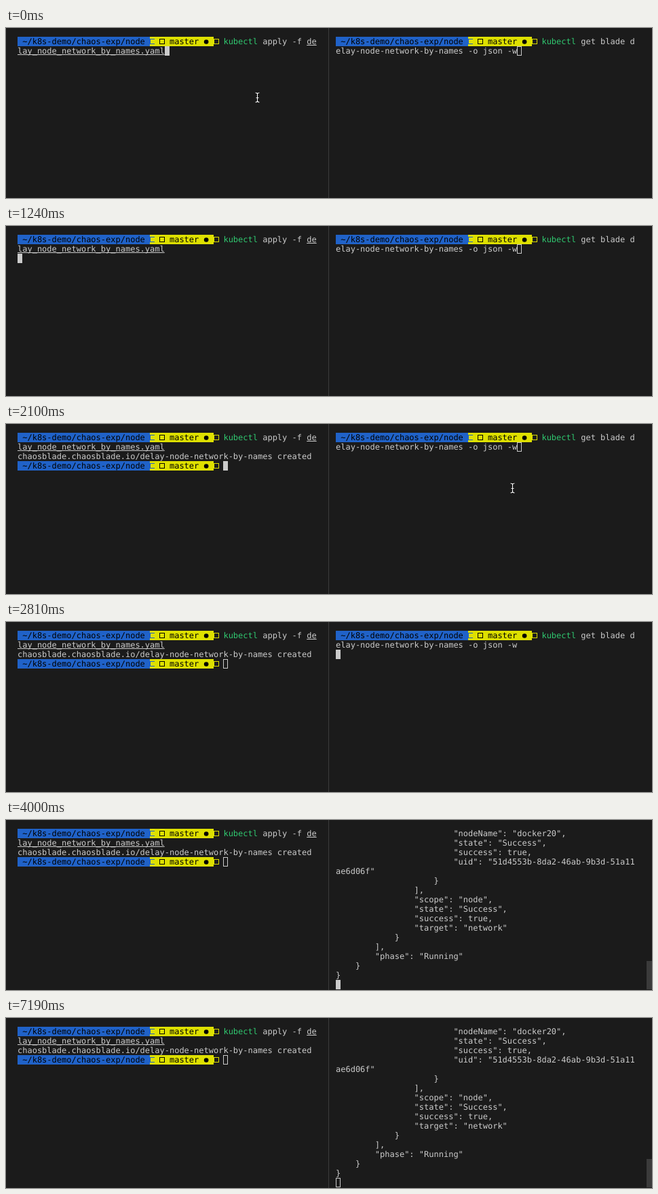
An HTML page with a canvas for the animation above (8000 ms loop, 952 by 252 pixels).

```html
<!DOCTYPE html>
<html lang="en">
<head>
<meta charset="utf-8">
<title>Terminal panes</title>
<style>
  html, body { margin: 0; width: 100%; height: 100%; overflow: hidden; background: #1b1b1b; }
  canvas { display: block; }
</style>
</head>
<body>
<canvas id="stage" width="952" height="252"></canvas>
<script>
const ctx = document.getElementById('stage').getContext('2d');
const LOOP = 8000, CELL = 7.224, ROW = 14, TOP = 13;
const LEFT = 17, RIGHT = 486;
const BG = '#1b1b1b', FG = '#cbcbcb', BLUE = '#2062c8', YELLOW = '#dee000', GREEN = '#30c870';

// When each thing happens, in ms
const APPLY = 860, CREATED = 1280, PROMPT = 1330, MOVE = 1670, ARRIVE = 2060;
const CLICK = 2290, WATCH = 2760, OUTPUT = 2950, BLUR = 5290;

const OUTPUT_LINES = [
  [24, '"nodeName": "docker20",'],
  [24, '"state": "Success",'],
  [24, '"success": true,'],
  [24, '"uid": "51d4553b-8da2-46ab-9b3d-51a11'],
  [0, 'ae6d06f"'],
  [20, '}'],
  [16, '],'],
  [16, '"scope": "node",'],
  [16, '"state": "Success",'],
  [16, '"success": true,'],
  [16, '"target": "network"'],
  [12, '}'],
  [8, '],'],
  [8, '"phase": "Running"'],
  [4, '}'],
  [0, '}'],
];

const colX = (pane, col) => pane + col * CELL;
const rowY = row => TOP + row * ROW;

function rect(x, y, w, h, color) {
  ctx.fillStyle = color;
  ctx.fillRect(x, y, w, h);
}

function frame(x, y, w, h, color) {
  ctx.strokeStyle = color;
  ctx.lineWidth = 1;
  ctx.strokeRect(x + 0.5, y + 0.5, w - 1, h - 1);
}

// Every character sits on the terminal grid.
function text(pane, col, row, string, color = FG) {
  ctx.fillStyle = color;
  [...string].forEach((char, i) => ctx.fillText(char, colX(pane, col + i), rowY(row) + 11));
}

function underlined(pane, col, row, string) {
  text(pane, col, row, string);
  rect(colX(pane, col), rowY(row) + 12, string.length * CELL, 1, FG);
}

function prompt(pane, row) {
  const y = rowY(row);
  const blueEnd = Math.round(colX(pane, 27)), yellowEnd = Math.round(colX(pane, 40));
  rect(pane, y, blueEnd - pane, ROW, BLUE);
  rect(blueEnd, y, yellowEnd - blueEnd, ROW, YELLOW);
  text(pane, 1, row, '~/k8s-demo/chaos-exp/node', '#000');
  rect(blueEnd, y + 3, 7, 1, BLUE);
  rect(blueEnd, y + 3, 1, 8, BLUE);
  rect(blueEnd, y + 10, 7, 1, BLUE);
  frame(Math.round(colX(pane, 29)), y + 3, 8, 8, '#000');
  text(pane, 31, row, 'master', '#000');
  ctx.beginPath();
  ctx.arc(colX(pane, 38.5), y + 7.5, 3.3, 0, Math.PI * 2);
  ctx.fill();
  frame(yellowEnd, y + 3, 8, 8, YELLOW);
}

function cursor(pane, col, row, focused) {
  const x = Math.round(colX(pane, col)), y = rowY(row);
  if (focused) rect(x, y, 7, ROW, FG);
  else frame(x, y, 7, ROW, FG);
}

function pointer(x, y) {
  ctx.save();
  ctx.translate(x + 0.5, y);
  ctx.beginPath();
  for (const s of [-1, 1]) {
    ctx.moveTo(-3, 7 * s);
    ctx.quadraticCurveTo(0, 7 * s, 0, 5 * s);
    ctx.quadraticCurveTo(0, 7 * s, 3, 7 * s);
  }
  ctx.moveTo(0, -5.5);
  ctx.lineTo(0, 5.5);
  ctx.moveTo(-2, 0.5);
  ctx.lineTo(2, 0.5);
  ctx.lineWidth = 2.6;
  ctx.strokeStyle = '#000';
  ctx.stroke();
  ctx.lineWidth = 1.2;
  ctx.strokeStyle = '#fff';
  ctx.stroke();
  ctx.restore();
}

function leftPane(t) {
  prompt(LEFT, 0);
  text(LEFT, 42, 0, 'kubectl', GREEN);
  text(LEFT, 50, 0, 'apply -f');
  underlined(LEFT, 59, 0, 'de');
  underlined(LEFT, 0, 1, 'lay_node_network_by_names.yaml');
  if (t >= CREATED) text(LEFT, 0, 2, 'chaosblade.chaosblade.io/delay-node-network-by-names created');
  if (t >= PROMPT) prompt(LEFT, 3);

  const focused = t < CLICK;
  if (t < APPLY) cursor(LEFT, 30, 1, focused);
  else if (t < CREATED) cursor(LEFT, 0, 2, focused);
  else if (t < PROMPT) cursor(LEFT, 0, 3, focused);
  else cursor(LEFT, 42, 3, focused);
}

function rightPane(t) {
  const focused = t >= CLICK && t < BLUR;
  if (t >= OUTPUT) {
    OUTPUT_LINES.forEach(([col, line], row) => text(RIGHT, col, row, line));
    cursor(RIGHT, 0, OUTPUT_LINES.length, focused);
    rect(944, 209, 8, 42, '#3b3b3b');
    return;
  }
  prompt(RIGHT, 0);
  text(RIGHT, 42, 0, 'kubectl', GREEN);
  text(RIGHT, 50, 0, 'get blade d');
  text(RIGHT, 0, 1, 'elay-node-network-by-names -o json -w');
  if (t < WATCH) cursor(RIGHT, 37, 1, focused);
  else cursor(RIGHT, 0, 2, focused);
}

// The pointer hides while keys are pressed.
function mouse(t) {
  if (t < APPLY) pointer(370, 103);
  else if (t >= MOVE && t < WATCH) {
    const p = Math.min(1, (t - MOVE) / (ARRIVE - MOVE));
    const eased = p * p * (3 - 2 * p);
    pointer(370 + 376 * eased, 103 - 8 * eased);
  }
  else if (t >= 3380 && t < 3430) pointer(742, 94);
  else if (t >= 3430 && t < 3480) pointer(712, 72);
}

function draw() {
  const t = performance.now() % LOOP;
  ctx.font = '12px "DejaVu Sans Mono", monospace';
  ctx.textRendering = 'geometricPrecision';
  rect(0, 0, 952, 252, BG);
  rect(475, 0, 1, 252, '#3c3c3c');
  leftPane(t);
  rightPane(t);
  mouse(t);
  requestAnimationFrame(draw);
}
draw();
</script>
</body>
</html>
```
